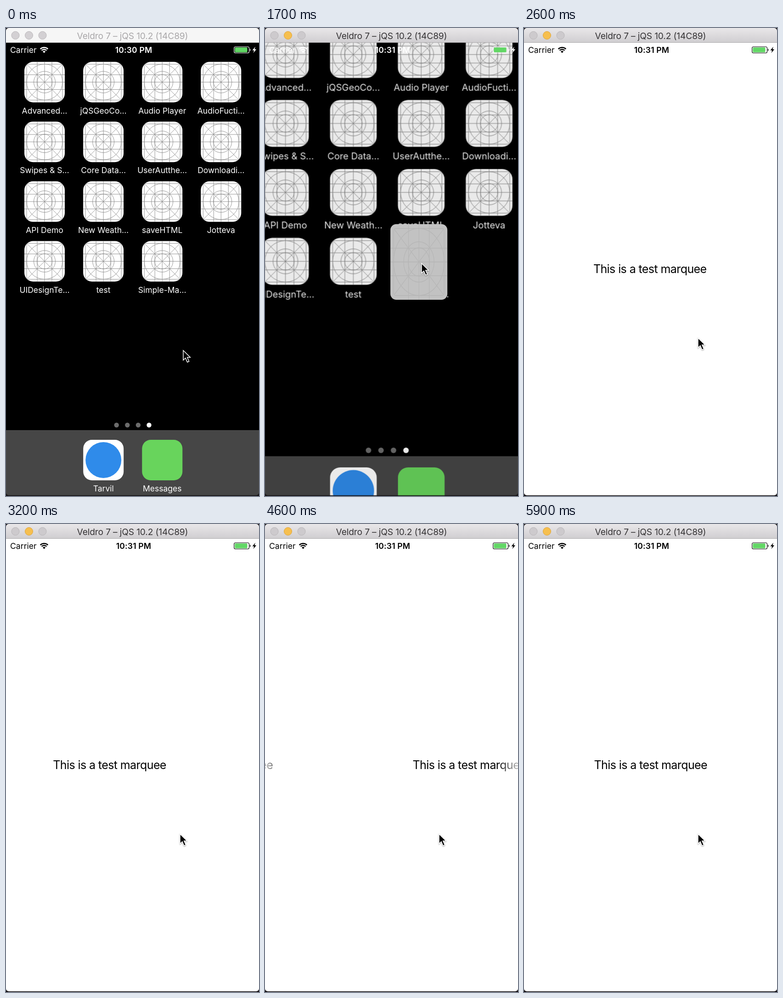
An HTML page that plays this animation: 551x1016 px, repeating every 6000 ms.

```html
<!DOCTYPE html>
<html lang="en">
<head>
<meta charset="utf-8">
<title>Marquee demo</title>
<style>
  html, body { margin: 0; width: 100%; height: 100%; overflow: hidden; background: #141014; }
  svg { display: block; width: 551px; height: 1016px; font-family: Inter, Roboto, sans-serif; }
  text { text-anchor: middle; }
  #title { font-size: 19.2px; letter-spacing: -0.15px; }
  #status { font-size: 17.6px; }
  #clock { letter-spacing: 0.15px; }
  #home text { font-size: 17.5px; fill: #fff; }
  #marquee text { font-size: 25px; letter-spacing: -0.59px; }
  #cursor { filter: drop-shadow(0 1px 1px rgba(0, 0, 0, .4)); }
</style>
</head>
<body>
<svg viewBox="0 0 551 1016">
  <defs>
    <clipPath id="frame"><rect width="551" height="1014.5" rx="6"/></clipPath>
    <clipPath id="screen"><rect y="32" width="551" height="983"/></clipPath>
    <clipPath id="tile"><rect x="-44" y="-44" width="88" height="88" rx="19"/></clipPath>
    <linearGradient id="bar" x2="0" y2="1">
      <stop stop-color="#e9e7e9"/><stop offset="1" stop-color="#cfcdd0"/>
    </linearGradient>
    <linearGradient id="fade" gradientUnits="userSpaceOnUse" x1="-16" x2="567" y1="0" y2="0">
      <stop stop-opacity="0"/><stop offset=".106"/><stop offset=".894"/><stop offset="1" stop-opacity="0"/>
    </linearGradient>
    <g id="grid" fill="none" stroke="#858585" stroke-width=".85" clip-path="url(#tile)">
      <path d="M-44-44 44 44M44-44-44 44M-44 0H44M-44-16H44M-44 16H44M-44-39H44M-44 39H44M0-44V44M-16-44V44M16-44V44M-39-44V44M39-44V44"/>
      <circle r="39"/><circle r="23.5"/><circle r="16.5"/>
    </g>
    <g id="icon">
      <rect x="-44" y="-44" width="88" height="88" rx="19" fill="#fff"/>
      <use href="#grid"/>
    </g>
  </defs>

  <g clip-path="url(#frame)">
    <rect width="551" height="1016"/>
    <g clip-path="url(#screen)">
      <g id="home"></g>
      <g id="launch">
        <rect id="card"/>
        <use id="cardGrid" href="#grid"/>
      </g>
      <g id="marquee">
        <text y="532" fill="url(#fade)">This is a test marquee</text>
        <text y="532" fill="url(#fade)">This is a test marquee</text>
      </g>
    </g>

    <g id="status" fill="currentColor">
      <text x="9" y="54" style="text-anchor:start">Carrier</text>
      <g fill="none" stroke="currentColor" stroke-width="2.5">
        <path d="M74.7 45.7a11.8 11.8 0 0 1 16.6 0M77.6 48.7a7.6 7.6 0 0 1 10.8 0"/>
      </g>
      <path d="M83 54.2 79.9 51a4.4 4.4 0 0 1 6.2 0Z"/>
      <text id="clock" x="278" y="54" font-weight="600"></text>
      <rect x="496.7" y="40.7" width="32.8" height="13.6" rx="3" fill="none" stroke="currentColor" stroke-width="1.1"/>
      <rect x="498.4" y="42.3" width="27.2" height="10.4" rx="1.6" fill="#62d765"/>
      <path d="M531 45c2 0 2 5 0 5ZM543 40.5 536.6 48.4H540.4L538.6 54.3 545.2 46.3H541.3Z"/>
    </g>

    <rect id="chrome" width="551" height="32"/>
    <rect id="edge" y="31" width="551" height="1"/>
    <g id="buttons" stroke-width="1">
      <circle cx="20.5" cy="16" r="8.5"/>
      <circle cx="50" cy="16" r="8.5"/>
      <circle cx="79.5" cy="16" r="8.5"/>
    </g>
    <text id="title" x="275.5" y="23.5">Veldro 7 – jQS 10.2 (14C89)</text>
  </g>
  <path id="cursor" d="M0 0V21L4.9 16.5 8.8 25.4 12.6 23.8 8.8 15H15.3Z" stroke="#fff" stroke-width="1.5"/>
</svg>

<script>
const $ = id => document.getElementById(id);
const set = (el, attrs) => { for (const k in attrs) el.setAttribute(k, attrs[k]); };
const clamp = v => Math.max(0, Math.min(1, v));
const mix = (a, b, p) => a + (b - a) * p;

const LOOP = 6000, STEP = 100;
const ORIGIN = { x: 340.3, y: 506.5 };
const apps = ['Advanced…', 'jQSGeoCo…', 'Audio Player', 'AudioFucti…',
  'Swipes & S…', 'Core Data…', 'UserAutthe…', 'Downloadi…',
  'API Demo', 'New Weath…', 'saveHTML', 'Jotteva',
  'UIDesignTe…', 'test', 'Simple-Ma…'];

function buildHome() {
  const label = (x, y, s) => `<text x="${x}" y="${y}">${s.replace('&', '&amp;')}</text>`;
  const square = (x, fill) => `<rect x="${x - 44}" y="894" width="88" height="88" rx="19" fill="${fill}"/>`;
  let out = apps.map((name, i) => {
    const x = 84 + (i % 4) * 128.1, y = 117.5 + Math.floor(i / 4) * 129.67;
    return `<use href="#icon" x="${x}" y="${y}"/>` + label(x, y + 68, name);
  }).join('');
  for (let i = 0; i < 4; i++)
    out += `<circle cx="${240.7 + i * 23.6}" cy="862" r="5.2" fill="${i < 3 ? '#6c6c6c' : '#fff'}"/>`;
  out += '<rect y="873" width="551" height="143" fill="#464646"/>';
  out += square(212.2, '#fff') + '<circle cx="212.2" cy="938" r="39" fill="#2f8bea"/>' + label(212.2, 1006, 'Tarvil');
  out += square(340.3, '#68d45c') + label(340.3, 1006, 'Messages');
  $('home').innerHTML = out;
}

// Cubic ease-in-out with handles at .42 and .58
function easeInOut(x) {
  let lo = 0, hi = 1;
  for (let i = 0; i < 24; i++) {
    const s = (lo + hi) / 2, r = 1 - s;
    if (1.26 * s * r * r + 1.74 * s * s * r + s * s * s < x) lo = s; else hi = s;
  }
  return lo * lo * (3 - 2 * lo);
}

// time, x, y
const path = [[0, 386, 700], [100, 386, 700], [800, 395, 557], [1000, 395, 557],
  [1500, 341, 511], [1800, 341, 511], [2100, 379, 673], [LOOP, 379, 673]];

function moveCursor(t) {
  const i = path.findIndex((p, n) => n && t <= p[0]);
  const [t0, x0, y0] = path[i - 1], [t1, x1, y1] = path[i];
  const p = easeInOut((t - t0) / (t1 - t0));
  set($('cursor'), { transform: `translate(${mix(x0, x1, p)} ${mix(y0, y1, p)})` });
}

function drawWindow(active) {
  set($('chrome'), { fill: active ? 'url(#bar)' : '#f6f6f6' });
  set($('edge'), { fill: active ? '#aba9ab' : '#d6d6d6' });
  set($('title'), { fill: active ? '#353335' : '#a9a7a9' });
  [...$('buttons').children].forEach((b, i) => {
    const lit = active && i === 1;
    set(b, { fill: lit ? '#f6bf4f' : active ? '#cdcacd' : '#d3d0d3', stroke: lit ? '#dea53c' : '#b9b6b9' });
  });
}

function drawLaunch(t) {
  const p = Math.pow(clamp((t - 1650) / 150), 2.3);
  const w = mix(87, 551, p), h = mix(93, 984, p);
  const cx = mix(ORIGIN.x, 275.5, p), cy = mix(ORIGIN.y, 524, p);
  const zoom = 1 + 1.93 * p, grey = Math.round(mix(189, 255, p));
  set($('home'), {
    opacity: 1 - p,
    transform: `translate(${ORIGIN.x} ${ORIGIN.y}) scale(${zoom}) translate(${-ORIGIN.x} ${-ORIGIN.y})`
  });
  set($('launch'), { opacity: p > 0 ? 1 : 0 });
  set($('card'), { x: cx - w / 2, y: cy - h / 2, width: w, height: h,
    rx: 14 * (1 - p), fill: `rgb(${grey},${grey},${grey})` });
  set($('cardGrid'), { transform: `translate(${cx} ${cy}) scale(${w / 88} ${h / 88})`, opacity: .2 * (1 - p) });
}

function drawMarquee(t) {
  const shift = 551 * easeInOut(clamp((t - 2471) / 3457));
  [...$('marquee').children].forEach((el, i) => set(el, { x: 275.7 + i * 551 - shift }));
  set($('marquee'), { opacity: clamp((t - 1785) / 330) });
}

function render(t) {
  drawWindow(t >= 1600);
  drawLaunch(t);
  drawMarquee(t);
  moveCursor(t);
  $('clock').textContent = t < 500 ? '10:30 PM' : '10:31 PM';
  set($('status'), { color: t < 1800 ? '#fff' : '#000' });
}

function tick() {
  const t = performance.now() % LOOP;
  render(Math.floor(t / STEP) * STEP);
  requestAnimationFrame(tick);
}

buildHome();
tick();
</script>
</body>
</html>
```
